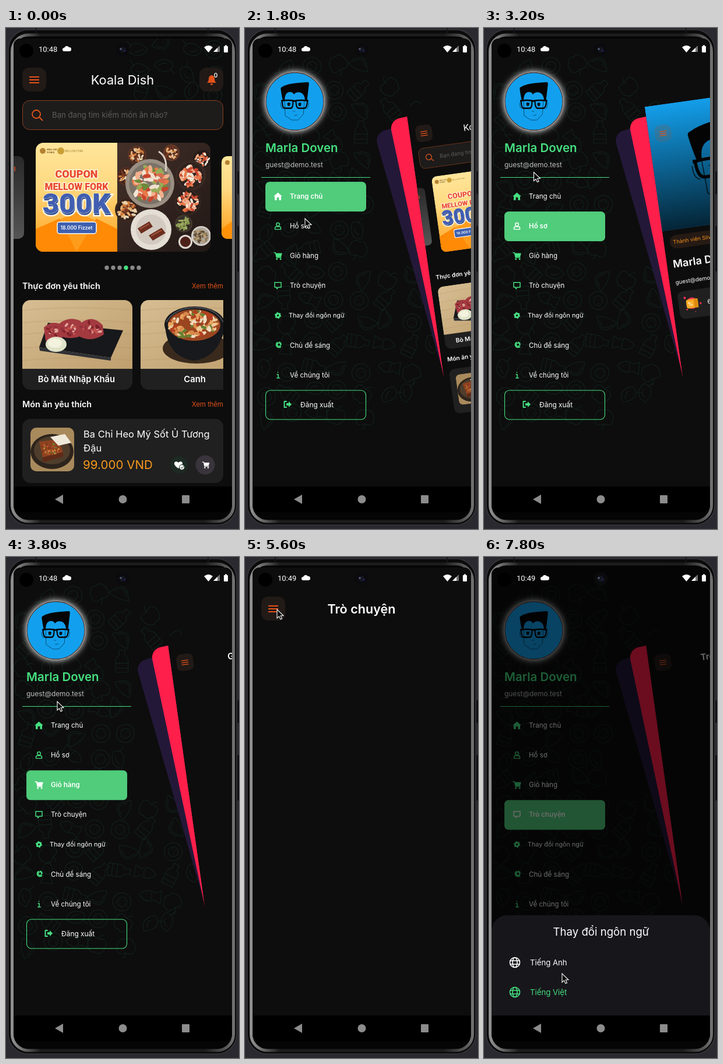
An HTML page for the animation above (8 s loop, 400 px wide and 860 px high).

```html
<!DOCTYPE html>
<html lang="vi">
<head>
<meta charset="utf-8">
<style>
html, body { margin: 0; width: 100%; height: 100%; overflow: hidden; background: #29292f; }
svg { display: block; width: 100vw; height: 100vh; font-family: Inter, "Noto Sans", sans-serif; }
.icon { fill: none; stroke: currentColor; stroke-width: 1.6; stroke-linejoin: round; stroke-linecap: round; }
.solid { fill: currentColor; }
</style>
</head>
<body>
<svg id="stage" viewBox="0 0 400 860"></svg>
<script>
const ORANGE = '#e4521b', GREEN = '#46df80', BG = '#0d0d0d', CARD = '#202020', INK = '#050505';
const STEP = 200, LOOP = 8000;

// --- markup helpers
const rect = (x, y, w, h, r, fill, more = '') =>
  `<rect x="${x}" y="${y}" width="${w}" height="${h}" rx="${r}" fill="${fill}" ${more}/>`;
const circle = (x, y, r, fill, more = '') => `<circle cx="${x}" cy="${y}" r="${r}" fill="${fill}" ${more}/>`;
const ellipse = (x, y, rx, ry, fill, more = '') =>
  `<ellipse cx="${x}" cy="${y}" rx="${rx}" ry="${ry}" fill="${fill}" ${more}/>`;
const path = (d, fill = 'none', more = '') => `<path d="${d}" fill="${fill}" ${more}/>`;
const line = (d, color, width = 1.5) => path(d, 'none', `stroke="${color}" stroke-width="${width}"`);
const text = (x, y, size, str, fill = '#fff', more = '') =>
  `<text x="${x}" y="${y}" font-size="${size}" fill="${fill}" ${more}>${str}</text>`;
const group = (content, more = '') => `<g ${more}>${content}</g>`;
const at = (x, y, content, color = '#fff', scale = 1) =>
  group(content, `transform="translate(${x} ${y}) scale(${scale})" color="${color}" class="icon"`);
const clip = (id, shape) => `<clipPath id="${id}">${shape}</clipPath>`;
const BOLD = 'font-weight="600"', MIDDLE = 'text-anchor="middle"', END = 'text-anchor="end"';

function seeded(seed) {
  return () => (seed = (seed * 16807) % 2147483647) / 2147483647;
}

// Small bits of food strewn over an ellipse
function strewn(seed, count, x, y, rx, ry, size, colors) {
  const rnd = seeded(seed);
  let out = '';
  for (let i = 0; i < count; i++) {
    const a = rnd() * 2 * Math.PI, d = Math.sqrt(rnd()), turn = rnd() * 180;
    const px = (x + rx * d * Math.cos(a)).toFixed(1), py = (y + ry * d * Math.sin(a)).toFixed(1);
    out += ellipse(px, py, size, size * .5, colors[i % colors.length], `transform="rotate(${turn.toFixed()} ${px} ${py})"`);
  }
  return out;
}

// --- icons, centred on 0,0
const solid = d => `<path class="solid" stroke="none" d="${d}"/>`;
const icons = {
  home: solid('M-8 0 0-7 8 0H6V7H2V2H-2V7H-6V0z'),
  user: '<circle cy="-3.2" r="3"/><path d="M-5.500 6V4q0-3 3-3h5q3 0 3 3v2z"/>',
  cart: solid('M-4-5H8L6 2H-3z') + '<path d="M-7-6h2.500l2 9H6"/><circle cx="-2" cy="6" r=".8"/><circle cx="5" cy="6" r=".8"/>',
  chat: '<path d="M-6-6H6V3H1L-2 6V3H-6z"/>',
  gear: '<circle r="3.4" stroke-width="3.4"/><circle r="5.3" stroke-width="1.7" stroke-dasharray="2.4 3.15" stroke-linecap="butt"/>',
  theme: '<path stroke-width="2.4" d="M-1-5A5 5 0 1 0 5 3"/><circle cx="2" cy="-1" r="3"/><path d="M2-6q4 1 4 5"/>',
  info: '<path stroke-width="1.700" d="M-1.500-1H.5V5M-2 5.500H3M0-5v.2"/>',
  exit: '<path stroke-width="2" d="M-2-5H-5.500V5H-2"/>' + solid('M-2-2H2V-5L7 0 2 5V2H-2z'),
  edit: '<path stroke-width="2" d="M1-8H-7Q-9-8-9-6V8q0 2 2 2H6Q8 10 8 8V1M-3 4l1-5L6-9q2-1.500 3.500 0T9.500-5L2 3z"/>',
  globe: '<circle r="8.500"/><ellipse rx="4" ry="8.500"/><path d="M-8-3H8M-8 3H8"/>',
  heart: solid('M0 6C-13-2-5-9 0-4 5-9 13-2 0 6z'),
  bell: solid('M-8 5Q-5 3-5-2-5-7 0-8 5-7 5-2 5 3 8 5zM-2.500 6.500h5Q2 9 0 9T-2.500 6.500z'),
};

// Faint food sketches scattered on a jittered grid
function doodles(x0, y0, cols, rows, seed, keep) {
  const rnd = seeded(seed);
  const shapes = [
    '<circle r="13"/><circle r="7"/><path d="M-4-2h2M3 1h2M-1 4h2"/>',
    '<path d="M0-8Q-14-14-13 2-8 16 0 11 8 16 13 2 14-14 0-8Q0-14 5-16"/>',
    '<path d="M-14 4Q-12-10 2-9T9 4Q2 12-14 4zM9 2l8 6M-8 2Q-4-5 3-4"/>',
    '<path d="M-15 8Q0-22 15 8 0 14-15 8zM-10 4Q0-12 10 4M-3 3h1M4 2h1"/>',
    '<path d="M-4-17h8v8q5 3 5 8v16H-9V-1q0-5 5-8zM-9 2H9M-9 9H9"/>',
    '<path d="M-16 0Q-6-12 6-5L15-9V9L6 5Q-6 12-16 0zM-8-1h1M0-6Q4 0 0 6"/>',
  ];
  let out = '';
  for (let i = 0; i < cols * rows; i++) {
    const x = x0 + (i % cols) * 42 + rnd() * 16, y = y0 + Math.floor(i / cols) * 40 + rnd() * 16;
    const turn = rnd() * 360, shape = shapes[Math.floor(rnd() * shapes.length)];
    if (keep(x, y)) out += group(shape, `transform="translate(${x.toFixed()} ${y.toFixed()}) rotate(${turn.toFixed()}) scale(1.2)"`);
  }
  return group(out, 'fill="none" stroke="#11201a"');
}

const face =
  line('M133 165 137 249 180 273H222L257 240 263 170M108 178Q107 209 124 213M291 177Q290 209 276 213', '#000a', 2.6) +
  path('M108 102Q108 95 116 93 150 75 230 70L282 67Q294 66 293 78L281 164 268 166Q264 132 240 124 212 116 195 133 180 114 156 122 134 130 134 164L121 165Q112 130 108 102Z', INK) +
  path('M117 168Q150 163 188 167 191 209 172 209H135Q118 208 117 168ZM208 167Q250 163 283 168 280 209 262 209H226Q208 209 208 167Z', 'none', `stroke="${INK}" stroke-width="8"`) +
  line('M188 171Q198 166 208 171M111 168H119M281 168H289', INK, 9) +
  circle(161, 187, 9, INK) + circle(233, 188, 9, INK) +
  line('M158 190q3 3 7-2M230 191q3 3 7-2', '#6f95a8', 1.6) +
  line('M149 184Q160 174 175 185M220 185Q235 174 247 185M188 224Q193 228 202 225M196 248Q210 249 218 243', '#000c', 2.2);

const menuLines = line('M40 84H57M40 89H57M40 94H57', ORANGE, 1.8);
const menuButton = rect(28, 68, 41, 41, 12, '#211a17', 'class="menu"') + menuLines;

// --- home page
function coupon() {
  const label = (y, size, str, fill, width) => text(121, y, size, str, fill,
    `${MIDDLE} font-family="Roboto, sans-serif" font-weight="900" stroke="#fff6df" stroke-width="${width}" paint-order="stroke"`);
  const plate = (x, y, r, base, colors) =>
    circle(x, y, r, base) + circle(x, y, r * .85, '#0003') + strewn(x * y, r * 2, x, y, r * .72, r * .66, r / 7 + 1, colors);
  const salmon = ['#e9794a', '#f3b08c', '#f2e5d3', '#c8452f'], grilled = ['#cf7a3c', '#e6b073', '#7d3a20', '#e8d3b0'],
    greens = ['#6d8a3c', '#98ab58', '#d96d4e', '#efe0ce'];
  const dishes = plate(225, 218, 16, '#5c3425', grilled) + plate(284, 214, 14, '#6b3a28', grilled) + plate(207, 255, 16, '#552d22', grilled) +
    plate(337, 225, 16, '#2a1e1b', salmon) + plate(208, 312, 21, '#3b2720', grilled) + plate(317, 253, 26, '#3b2a24', salmon) +
    plate(312, 299, 23, '#33251f', salmon) + plate(247, 267, 42, '#9a8f82', [...salmon, ...greens]) +
    line('M262 212Q278 222 274 246', '#d8d0c4', 3) +
    circle(249, 346, 35, '#e4ded5') + circle(249, 346, 26, '#d3cbc1') +
    path('M226 344l20-12 6 9-20 12zM245 356l22-13 7 9-22 13z', '#6d2e20') + line('M230 345l16-9M249 357l18-10', '#a55a3a', 2) +
    plate(305, 336, 15, '#443a30', ['#87974d', '#a0ad62']) + plate(335, 357, 17, '#d9d2c8', ['#927a57', '#b59a72', '#5d4a33']) +
    circle(308, 367, 12, '#dfd8d0') + circle(308, 367, 9, '#4c2119');
  return rect(51, 197, 141, 187, 0, 'url(#cream)') +
    path('M51 347 121 316 191 347V384H51Z', '#ff9c1c') + path('M51 345 92 327 121 384H51ZM191 345 155 327 121 384H191Z', '#ff8a06') +
    circle(63, 211, 5, '#b58232') + text(70, 210, 4, 'MELLOW', '#70501f', BOLD) + text(70, 215, 4, 'FORKS', '#70501f', BOLD) +
    circle(94, 211, 6, '#c99f35') + text(101, 213, 4.3, 'MELLOW FORK', '#9b7930') +
    label(257, 18, 'COUPON', '#e9492f', 3) + label(278, 16, 'MELLOW FORK', '#e9492f', 3) +
    group(label(320, 49, '300K', '#2c4890', 5), 'transform="translate(1 1)"') + label(318, 49, '300K', '#405eb1', 1) +
    rect(88, 333, 67, 20, 4, '#3d5fae', 'stroke="#fff" stroke-width="1.500"') + text(121, 346, 8.5, '18.000 Fizzet', '#fff', `${MIDDLE} ${BOLD}`) +
    rect(191, 197, 160, 187, 0, 'url(#table)') + dishes;
}

function cards() {
  const wood = (x, y, w, h) => rect(x, y, w, h, 0, 'url(#wood)') +
    line([.15, .33, .5, .7, .88].map(k => `M${x} ${y + h * k}q${w / 2}-9 ${w} 0`).join(''), '#a9865433', 2);
  const fat = ['#e2a79c', '#7d2028', '#c0504c', '#93303a'];
  const tray = path('M72 506 201 519 180 566 57 548Z', '#17181b') + path('M57 548l123 18v5L58 554z', '#2f3135') +
    path('M92 507Q109 494 128 503L138 522Q122 537 96 530ZM129 506Q149 491 166 510L168 526Q147 540 127 530ZM65 514Q78 502 93 508L97 533 68 537Z', '#a33a40') +
    strewn(31, 16, 113, 515, 18, 12, 4, fat) + strewn(32, 16, 148, 516, 16, 12, 4, fat) + strewn(33, 10, 80, 521, 11, 11, 3.5, fat) +
    ellipse(86, 543, 18, 13, '#dfe3c9') + ellipse(84, 541, 12, 8, '#f3f2dd');
  const pot = ellipse(327, 550, 58, 26, '#3a2a1d') + path('M273 509Q276 565 323 571 367 565 377 509Z', '#17191c') +
    ellipse(324, 509, 52, 31, '#17181b') + line('M275 505Q290 480 325 480T373 505', '#4a4d52', 2) + ellipse(323, 510, 45, 27, '#9a4520') +
    strewn(19, 100, 322, 510, 40, 23, 5, ['#d9894b', '#eccb9a', '#b53f20', '#668031', '#e7a35c', '#f0dcc0']);
  const card = (x, name, dish) => group(
    rect(x, 467, 189, 155, 0, CARD) + wood(x, 467, 189, 118) + dish +
    text(x + 93, 608, 14.8, name, '#fff', `${MIDDLE} ${BOLD}`), `clip-path="url(#card${x})"`);
  return card(28, 'Bò Mát Nhập Khẩu', tray) + group(card(231, 'Canh', pot), 'clip-path="url(#cardList)"');
}

function favourite() {
  const dish = group(rect(42, 686, 75, 75, 0, '#a98a5c') + ellipse(79, 727, 37, 30, '#2d241c') + ellipse(79, 725, 31, 24, '#4f3d2b') +
    path('M57 710 90 706 98 728 63 737Z', '#8f4220') + path('M63 737l35-9v8l-34 9z', '#5f2a18') +
    path('M76 702 101 697 112 712 90 717Z', '#efe9db') + strewn(5, 34, 77, 723, 16, 10, 2.4, ['#d08a3e', '#b8552a', '#6f7d35', '#7a3219']), 'clip-path="url(#thumb)"');
  return rect(28, 671, 345, 110, 14, CARD) + dish +
    text(133, 703, 16.5, 'Ba Chỉ Heo Mỹ Sốt Ủ Tương') + text(133, 727, 16.5, 'Đậu') +
    text(132, 757, 20.6, '99.000 VND', '#f99a1c') +
    circle(297, 750, 15, '#1d2a23') + at(296, 750, icons.heart) + circle(302, 754, 4.5, '#fff', 'stroke="#1d2a23"') + line('M300 754l2 2 3-4', '#1d2a23', 1) +
    circle(342, 750, 16.5, '#39343c') + at(343, 750, icons.cart, '#fff', .8);
}

const dots = [173, 184, 195, 206, 217, 228].map((x, i) => circle(x, 411.5, 3.7, i === 3 ? GREEN : '#888')).join('');
const heading = (y, str) => text(28, y, 14.4, str, '#fff', BOLD) + text(373, y - 1, 11.3, 'Xem thêm', ORANGE, END);

const homePage = doodles(225, 25, 4, 4, 51, () => true) + menuButton +
  text(200, 97, 21.8, 'Koala Dish', '#fff', MIDDLE) +
  rect(332, 68, 41, 41, 12, '#211a17') + at(353, 89, icons.bell, ORANGE) + text(360, 85, 10, '0', '#fff', `${MIDDLE} ${BOLD}`) +
  rect(28.5, 124.5, 344, 50, 12, '#1d1c1b', 'stroke="#8a3d1d"') +
  circle(52, 148, 7, 'none', `stroke="${ORANGE}" stroke-width="1.8"`) + line('M57 153l6 6', ORANGE, 1.8) +
  text(79, 154, 13.2, 'Bạn đang tìm kiếm món ăn nào?', '#5c5c5c') +
  rect(-60, 220, 91, 142, 10, 'url(#grey)') + line('M15 238v8', ORANGE) +
  rect(370, 220, 90, 142, 10, 'url(#cream)') + path('M370 345 388 332V362H382Q370 362 370 350Z', '#ff9209') + circle(380, 231, 4, '#b58232') +
  group(coupon(), 'clip-path="url(#banner)"') + dots +
  heading(448, 'Thực đơn yêu thích') + cards() + heading(651, 'Món ăn yêu thích') + favourite();

// --- other pages
const profilePage = rect(13, 18, 375, 308, 0, '#139eea') + face + rect(13, 18, 375, 308, 0, 'url(#shade)') +
  rect(28, 68, 41, 41, 14, '#6b6560', 'opacity=".32"') + menuLines +
  rect(28, 340, 124, 33, 16.5, '#261a14') + text(36, 361, 13, 'Thành viên Sliver', '#f5911e') +
  text(28, 419, 26, 'Marla Doven', '#fff', BOLD) + at(351, 410, icons.edit, GREEN) +
  text(28, 460, 13.7, 'guest@demo.test') + rect(28, 479, 345, 68, 13, CARD) +
  circle(61, 511, 14, '#f2285a') + circle(45, 496, 3, '#f2285a') + circle(82, 514, 2.5, '#f2285a') + circle(47, 525, 2, '#f2285a') + circle(67, 533, 1.2, '#f2285a') +
  rect(47, 501, 29, 22, 5, '#f7a922') + path('M66 501h10v22H66z', '#dd8a12') + text(50, 517, 13, '%', '#fff', BOLD) +
  text(99, 518, 15, '6 Phiếu giảm giá');
const titledPage = title => menuButton + text(200, 97, 21.6, title, '#fff', `${MIDDLE} ${BOLD}`);
const pages = [homePage, profilePage, titledPage('Giỏ hàng'), titledPage('Trò chuyện')];

// --- drawer
const ROW = 51.1;
const menu = [['home', 'Trang chủ'], ['user', 'Hồ sơ'], ['cart', 'Giỏ hàng'], ['chat', 'Trò chuyện'],
  ['gear', 'Thay đổi ngôn ngữ'], ['theme', 'Chủ đề sáng'], ['info', 'Về chúng tôi']];
const menuRows = menu.map(([icon, label], i) => {
  const y = 289 + i * ROW, small = icon === 'gear';
  return group(at(56.5, y, icons[icon], 'inherit', .92) + text(small ? 75 : 77, y + 4, small ? 10.8 : 11.6, label), 'class="row"');
}).join('');

const drawer = rect(13, 18, 375, 813, 0, BG) +
  doodles(24, 58, 8, 16, 8, (x, y) => !(x > 215 && y > 165 && y < 420) && Math.hypot(x - 130, (y - 370) * .65) < 222) +
  circle(85.5, 126, 51, '#fff', 'filter="url(#glow)"') + circle(85.5, 126, 50.5, '#fff') + circle(85.5, 126, 49.5, '#12a0ee', 'stroke="#4a322c" stroke-width="1.3"') +
  group(face, 'transform="translate(33 72) scale(.262 .315)"') +
  text(35, 213, 20.5, 'Marla Doven', GREEN, BOLD) + text(35, 239, 11.9, 'guest@demo.test', '#bdbdbd') +
  line('M28 256.500H215', GREEN, 1.2) +
  rect(35, 264, 173, 51, 7, '#50cc7b', 'id="selected"') + menuRows +
  rect(35.5, 622, 172, 50, 8, 'none', `stroke="${GREEN}" stroke-width="1.1"`) + at(73, 646, icons.exit, GREEN) + text(95, 651, 11.9, 'Đăng xuất');

const sheet = rect(13, 615, 375, 220, 27, '#17161b') + text(201, 650, 18.6, 'Thay đổi ngôn ngữ', '#fff', MIDDLE) +
  at(53, 696, icons.globe) + text(79, 701, 13.2, 'Tiếng Anh') +
  at(53, 747, icons.globe, GREEN) + text(79, 752, 13.2, 'Tiếng Việt', GREEN);

const statusBar = circle(35, 39, 12, '#000') + text(56, 41, 13, '10:48', '#fff', 'id="clock" font-family="Roboto, sans-serif"') +
  path('M100 40a3 3 0 0 1 0-6 4.500 4.500 0 0 1 8-1 3.500 3.500 0 0 1 1 7z', '#fff') +
  circle(200.5, 37.5, 11.5, '#0b0b0e') + circle(200.5, 37.5, 5, '#14151f') + circle(197, 36, 1.8, '#565b78') + circle(204, 39, 1, '#3534a0') +
  path('M340 33q7.500-6 15 0l-7.500 9z', '#fff') + path('M367 30V41H356z', '#777') + path('M363 34V41H356z', '#fff') + rect(374, 31, 7, 11, 1.3, '#fff') + rect(376, 29.5, 3, 2, 0, '#fff');
const navBar = rect(13, 787, 375, 44, 0, '#000') + path('M98 801V817L84 809Z', '#8c8c8c') + circle(200.5, 809, 7, '#8c8c8c') + rect(302, 802, 13, 14, 1, '#8c8c8c');

const gradient = (id, x2, y2, ...stops) => `<linearGradient id="${id}" x2="${x2}" y2="${y2}">` +
  stops.map(([offset, color]) => `<stop offset="${offset}" stop-color="${color}"/>`).join('') + '</linearGradient>';
const defs = gradient('cream', 0, 1, [0, '#ffe69b'], [.4, '#ffd980'], [.8, '#ffb23c'], [1, '#ff970e']) +
  gradient('table', 1, 1, [0, '#443029'], [1, '#211816']) + gradient('wood', 1, 1, [0, '#d6bd92'], [1, '#bf9f6e']) +
  gradient('grey', 0, 1, [0, '#292929'], [1, '#555']) + gradient('shade', 0, 1, [0, '#0000'], [1, '#000000c4']) +
  gradient('rail', 1, 0, [0, '#8f8f8f'], [.04, '#777'], [.13, '#1c1c1d'], [.87, '#1c1c1d'], [.96, '#555'], [1, '#707070']) +
  '<filter id="glow" x="-50%" y="-50%" width="200%" height="200%"><feGaussianBlur stdDeviation="6"/></filter>' +
  clip('screen', rect(13, 18, 375, 813, 12, '#000')) + clip('pageBox', rect(13, 18, 375, 800, 0, '#000')) +
  clip('banner', rect(51, 197, 300, 187, 13, '#000')) + clip('cardList', rect(28, 460, 345, 170, 0, '#000')) +
  clip('card28', rect(28, 467, 189, 154, 14, '#000')) + clip('card231', rect(231, 467, 189, 154, 14, '#000')) + clip('thumb', rect(42, 686, 75, 75, 10, '#000'));

const phone = rect(4, 3, 392, 850, 34, '#0b0b0c', 'stroke="#37373b" stroke-width="1.5"') +
  rect(10.5, 12, 380, 835, 28, INK, 'stroke="url(#rail)" stroke-width="5"') +
  line('M52 0V9M347 0V9', '#17171a', 2) + rect(397.5, 246, 3, 39, 1, '#0c0c0e') + rect(397.5, 340, 3, 78, 1, '#0c0c0e');

document.getElementById('stage').innerHTML = `<defs>${defs}</defs>` + phone +
  group(drawer + rect(0, 0, 375, 670, 26, '#241839', 'id="backLayer"') + rect(0, 0, 375, 670, 26, '#ff1f4b', 'id="frontLayer"') +
    group(group(rect(13, 18, 375, 800, 0, BG) + pages.map(p => group(p, 'class="page"')).join(''), 'clip-path="url(#pageBox)"'), 'id="sheetPage"') +
    rect(13, 18, 375, 813, 0, '#000', 'id="dim"') + group(sheet, 'id="sheet"') + statusBar + navBar, 'clip-path="url(#screen)"') +
  path('M0 0V15L3.500 11.800 6 17 8.500 16 6.200 10.800H11Z', INK, 'id="cursor" stroke="#fff" stroke-width="1.1"');

// --- motion
const $ = id => document.getElementById(id);
const ease = k => { k = Math.min(1, Math.max(0, k)); return k * k * (3 - 2 * k); };
const ramp = (t, from, length = 300) => ease((t - from) / length);
const pageElements = document.querySelectorAll('.page'), rowElements = document.querySelectorAll('.row');
const menuElements = document.querySelectorAll('.menu');

const opens = [600, 2850, 4500, 5850], closes = [2050, 3900, 5150], pageChanges = [2000, 3500, 5100];
const cursorPath = [[200, 190, 260], [400, 80, 120], [600, 52, 88], [900, 55, 90], [1500, 100, 318], [1800, 103, 327],
  [2000, 103, 338], [2500, 65, 100], [2800, 62, 84], [3000, 66, 110], [3400, 105, 385], [3600, 105, 388], [3800, 88, 248],
  [4100, 55, 88], [4500, 55, 88], [4800, 150, 376], [5000, 132, 440], [5200, 130, 438], [5600, 55, 90], [5900, 55, 90],
  [6400, 6, 574], [6900, 110, 495], [7150, 112, 495], [7600, 138, 690], [7800, 134, 715]];

function cursorAt(t) {
  const next = cursorPath.findIndex(point => point[0] > t);
  if (next < 0) return cursorPath.at(-1).slice(1);
  const [t0, x0, y0] = cursorPath[next - 1], [t1, x1, y1] = cursorPath[next];
  const k = (t - t0) / (t1 - t0);
  return [x0 + (x1 - x0) * k, y0 + (y1 - y0) * k];
}

const place = (id, x, y, angle, scale) => $(id).setAttribute('transform', `translate(${x} ${y}) rotate(${angle}) scale(${scale})`);

function draw(t) {
  const sum = times => times.reduce((total, start) => total + ramp(t, start), 0);
  const open = sum(opens) - sum(closes), scale = 1 - .3 * open;
  place('sheetPage', 265 * open, 124 * open, -8 * open, scale);
  place('frontLayer', 13 + 234.5 * open, 18 + 140.5 * open, -12 * open, scale);
  place('backLayer', 13 + 209 * open, 18 + 163 * open, -16 * open, scale);

  const current = pageChanges.filter(change => t >= change).length;
  pageElements.forEach((page, i) => page.setAttribute('display', i === current ? 'inline' : 'none'));
  rowElements.forEach((row, i) => {
    row.setAttribute('color', i === current ? '#fff' : GREEN);
    row.setAttribute('font-weight', i === current ? 600 : 400);
  });
  $('selected').setAttribute('y', 264 + current * ROW);
  const pressed = t >= 4600 && t < 5000;
  menuElements.forEach(button => button.setAttribute('fill', pressed ? '#3d3936' : '#211a17'));

  const raised = ramp(t, 7050, 350);
  $('dim').setAttribute('opacity', .58 * raised);
  place('sheet', 0, 180 * (1 - raised), 0, 1);
  $('clock').textContent = t < 5600 ? '10:48' : '10:49';

  $('cursor').setAttribute('display', t < 200 ? 'none' : 'inline');
  if (t >= 200) place('cursor', ...cursorAt(t), 0, 1);
}

const start = performance.now();
function tick() {
  const t = (performance.now() - start) % LOOP;
  draw(Math.floor(t / STEP) * STEP);
  requestAnimationFrame(tick);
}
tick();
</script>
</body>
</html>
```
